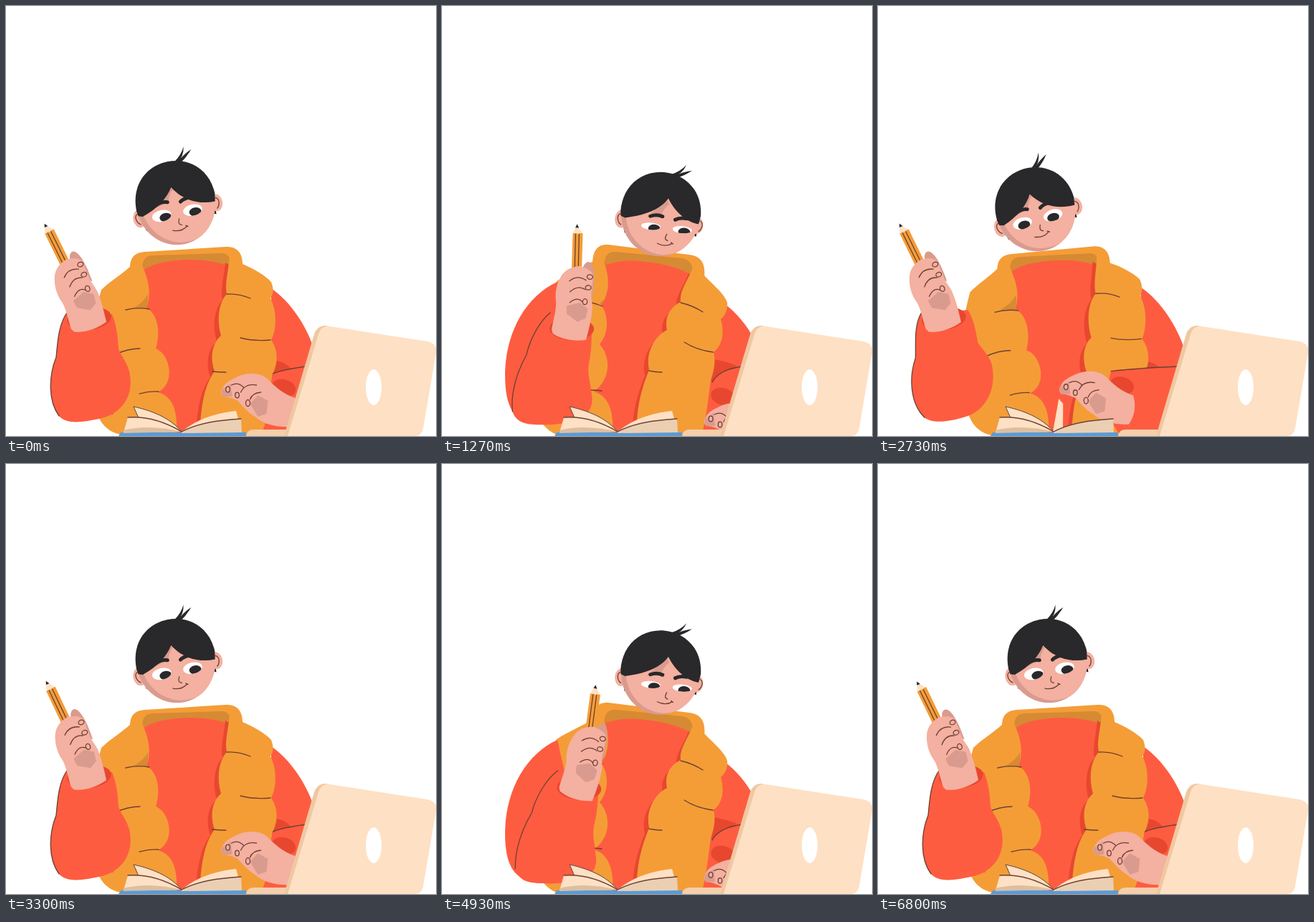
Recreate the animation shown at these times as an HTML page. Size 600 by 600 pixels, loop 6.83 s.

```html
<!DOCTYPE html>
<html lang="en">
<head>
<meta charset="utf-8">
<title>Studying</title>
<style>
html, body { margin: 0; width: 100%; height: 100%; overflow: hidden; background: #fff; }
svg { display: block; width: 100%; height: 100%; }
.red { fill: #fe5c40; }
.deep { fill: #e8472f; }
.vest { fill: #f49d37; }
.fold { fill: #d68a33; }
.skin { fill: #f4b0a0; }
.shade { fill: #d99b8e; }
.ink { fill: #29282a; }
.paper { fill: #fee0c4; }
.line { fill: none; stroke: #6d4034; stroke-width: 1.3; stroke-linecap: round; }
.nails { fill: #f4b0a0; }
.edge { stroke: #5b463c; stroke-width: 1; }
.brow { fill: none; stroke: #29282a; stroke-width: 5; stroke-linecap: round; }
</style>
</head>
<body>
<svg viewBox="0 0 600 600">
  <defs>
    <clipPath id="faceClip"><ellipse rx="55" ry="58.5"/></clipPath>
    <clipPath id="eyeClip">
      <ellipse class="eye" cx="-19" cy="15" rx="13.5" ry="8"/>
      <ellipse class="eye" cx="25" cy="16" rx="13.5" ry="8"/>
    </clipPath>
    <path id="panel" data-k="torso"
      d="M312 350 L330 360 C345 366 362 376 370 385 C374 395 373 402 369 408 C378 425 378 450 370 466 C380 480 380 500 371 515 C372 540 365 580 355 600 L270 600 C272 560 276 530 291 510 C284 490 288 470 300 460 C294 440 296 415 308 402 C305 388 310 372 312 350 Z"
      data-r="M350 365 L366 376 C375 386 395 402 398 414 C399 424 395 432 389 437 C394 455 392 473 379 483 C382 495 380 508 375 522 C372 545 368 580 362 600 L272 600 C270 560 280 530 289 508 C284 485 295 462 314 452 C310 435 318 420 333 413 C331 398 342 385 350 365 Z"/>
  </defs>

  <g id="body">
    <path class="red" data-k="torso"
      d="M370 394 C398 413 419 447 429 476 L430 605 L345 600 L370 500 Z"
      data-r="M392 414 C412 428 426 447 434 462 L430 605 L350 600 L375 490 Z"/>
    <path class="deep" data-k="torso"
      d="M372 494 Q392 496 398 508 L372 515 Z" data-r="M374 492 Q398 496 412 502 L376 524 Z"/>
    <path class="vest" data-k="torso"
      d="M173 370 C172 352 178 344 194 343 L306 336 C322 335 331 344 330 364 L314 368 L190 370 Z"
      data-r="M210 362 C210 342 216 332 232 333 L345 347 C362 349 368 360 366 378 L350 380 L222 365 Z"/>
    <path class="fold" data-k="torso"
      d="M190 368 C190 354 194 349 204 348 L300 345 C310 345 314 350 313 366 Z"
      data-r="M226 362 C227 347 232 342 244 343 L335 352 C346 354 351 360 350 380 Z"/>
    <path class="red" data-k="torso"
      d="M190 370 C205 358 230 355 255 354 C280 354 300 358 314 364 L330 605 L195 605 Z"
      data-r="M226 362 C245 355 265 354 285 357 C310 360 335 366 352 378 L330 605 L200 605 Z"/>
    <use class="deep" href="#panel" transform="translate(-6 8)"/>
    <path class="vest" data-k="torso"
      d="M175 362 C160 376 145 384 133 396 C120 440 110 500 125 560 C130 585 145 595 160 598 L238 600 C240 570 235 545 212 539 C238 525 228 485 209 478 C216 455 212 430 196 421 C204 400 198 380 190 362 Z"
      data-r="M211 356 C195 366 175 374 160 384 C140 430 120 500 130 560 C135 580 145 592 160 598 L238 600 C240 570 235 545 212 538 C236 520 236 490 220 472 C234 455 232 430 222 417 C234 400 234 380 227 360 Z"/>
    <path class="fold" data-k="torso" d="M198 402 Q192 414 178 421 L196 422 Q199 412 198 402 Z"
      data-r="M230 404 Q226 410 220 415 L222 417 Q228 410 230 404 Z"/>
    <use class="vest" href="#panel"/>
    <path class="line" data-k="torso"
      d="M167 424 Q183 420 200 423 M153 486 Q170 478 187 478 M186 541 Q200 537 213 538"
      data-r="M190 412 Q208 412 224 419 M170 476 Q182 470 200 470 M196 537 Q210 535 223 537"/>
    <path class="line" data-k="torso"
      d="M308 402 Q325 401 341 408 M327 463 Q345 468 369 466 M288 510 Q298 511 307 511"
      data-r="M333 414 Q350 418 364 427 M338 469 Q355 480 378 483 M289 509 Q298 511 307 511"/>
  </g>

  <g id="head">
    <path class="ink" d="M-55 0 L-48 30 L0 0 L52 27 L55 0 Z"/>
    <g id="tuft" class="ink">
      <path d="M9 -56 Q20 -64 25 -76 Q24 -62 13 -54 Z"/>
      <path d="M13 -55 Q25 -66 35 -71 Q28 -61 17 -53 Z"/>
    </g>
    <ellipse class="skin" cx="-54" cy="11" rx="9" ry="12.5"/>
    <ellipse id="farEar" class="skin" cx="55" cy="11" rx="9" ry="12"/>
    <path class="line" d="M-50 4 Q-60 2 -59 11 Q-58 17 -54 19 M55 4 Q60 6 59 12 Q58 17 55 19"/>
    <ellipse class="shade" rx="55" ry="58.5"/>
    <g clip-path="url(#faceClip)"><ellipse class="skin" cx="6" cy="-4" rx="55" ry="60"/></g>
    <g id="look">
      <path class="shade" d="M0 -24 L-26 3 L-6 -2 Q-3 -12 4 -18 Z"/>
      <g fill="#fff">
        <ellipse class="eye" cx="-19" cy="15" rx="13.5" ry="8"/>
        <ellipse class="eye" cx="25" cy="16" rx="13.5" ry="8"/>
      </g>
      <g class="ink" clip-path="url(#eyeClip)">
        <g id="pupils">
          <ellipse cx="-14" cy="18" rx="8.5" ry="6"/>
          <ellipse cx="28" cy="19" rx="8.5" ry="6"/>
        </g>
      </g>
      <path id="brows" class="brow" d="M-21 1 Q-12 -3 -4 0 M14 3 Q20 -1 30 0"/>
      <path class="line" d="M4 24 Q0 32 6 33 M-8 38 Q4 43 13 36 M11 35 L14 37"/>
    </g>
    <path class="ink" data-k="face"
      d="M-56 0 C-56 -37 -30 -59 0 -59 C30 -59 56 -37 56 -2 L54 9 C35 9 14 -2 2 -23 C-6 -10 -22 2 -49 9 L-55 7 Z"
      data-r="M-56 0 C-56 -37 -30 -59 0 -59 C30 -59 56 -37 56 -2 L54 9 C36 9 15 -2 3 -23 C-5 -10 -21 2 -49 9 L-55 7 Z"/>
  </g>

  <path class="red" data-k="shoulder"
    d="M120 450 C105 450 90 465 82 490 C68 520 66 560 90 570 L150 570 Z"
    data-r="M161 385 C118 404 88 455 88 515 C88 560 100 584 140 584 L205 580 Z"/>
  <path class="red" data-k="arm"
    d="M85 428 C73 445 72 470 70 490 C60 515 58 550 74 572 C85 585 110 580 130 576 C160 570 180 545 172 510 C168 495 160 488 157 478 C156 460 154 445 148 430 Z"
    data-r="M150 428 C135 440 122 465 117 487 C104 510 95 540 98 566 C105 586 125 584 150 584 C190 582 214 570 208 540 C206 520 202 515 204 500 C208 480 208 465 208 445 Z"/>
  <path class="line" data-k="arm"
    d="M85 428 C73 445 72 470 70 490 C60 515 58 550 74 572"
    data-r="M150 428 C135 440 122 465 117 487 C104 510 95 540 98 566"/>

  <ellipse id="cuffL" class="deep" rx="31" ry="16"/>
  <g id="handL">
    <path class="shade" d="M8 -86 C9 -96 16 -100 20 -94 C26 -85 26 -65 25 -48 L8 -60 Z"/>
    <path class="vest" d="M-10 -135 L4 -136 L7 -80 L-7 -80 Z"/>
    <path class="paper" d="M-10 -134 L-6 -145 L-4 -145 L4 -135 Q0 -138 -3 -134 Q-6 -138 -10 -134 Z"/>
    <path class="ink" d="M-7 -143 L-5 -148 L-2 -143 Z"/>
    <path class="line" d="M-6 -134 L-3 -84 M-1 -134 L2 -84"/>
    <path class="skin" d="M-28 2 C-27 -12 -24 -24 -25 -36 C-29 -52 -25 -66 -21 -74 C-16 -84 -6 -89 4 -90 C14 -88 25 -84 24 -74 C22 -68 24 -62 23 -56 C22 -48 26 -40 26 -32 C26 -18 24 -4 21 12 C4 16 -14 14 -26 7 Z"/>
    <path class="shade" d="M-10 -33 L8 -39 L20 -31 L18 -18 L7 -12 L-9 -22 Z"/>
    <path class="line" d="M-9 -68 Q1 -78 14 -71 M-7 -53 Q3 -64 14 -58 M-6 -38 Q4 -48 12 -40"/>
    <g class="line" style="fill:#f4b0a0">
      <ellipse cx="19" cy="-76" rx="4" ry="3.2"/>
      <ellipse cx="18" cy="-61" rx="4" ry="3.2"/>
      <ellipse cx="15" cy="-41" rx="3.2" ry="4"/>
    </g>
  </g>

  <path id="sleeve" class="red"/>
  <path id="sleeveLine" class="line"/>
  <ellipse id="cuffR" class="deep" rx="17" ry="12"/>
  <path id="page" class="paper"/>
  <g id="handR">
    <path class="skin" d="M-83 -12 C-80 -20 -70 -24 -64 -27 C-50 -34 -30 -34 -20 -24 C-10 -14 0 -4 18 2 Q24 24 12 42 C-5 43 -25 40 -38 28 C-48 22 -55 14 -62 6 C-70 2 -76 0 -82 0 C-86 -3 -86 -8 -83 -12 Z"/>
    <path class="shade" d="M-84 -10 L-72 -18 L-70 0 L-82 0 Q-86 -4 -84 -10 Z M-45 10 L-34 -2 L-20 6 L-22 24 L-34 28 Z"/>
    <path class="line" d="M-71 -16 Q-62 -21 -54 -13 M-58 -6 Q-52 -19 -36 -16 M-45 4 Q-42 -5 -30 -6"/>
    <g class="line" style="fill:#f4b0a0">
      <ellipse cx="-76" cy="-10" rx="2.8" ry="3.8"/>
      <ellipse cx="-63" cy="-2" rx="2.8" ry="3.8"/>
      <ellipse cx="-48" cy="9" rx="3" ry="4.5"/>
    </g>
  </g>

  <g id="book">
    <path fill="#5b9bd5" d="M157 600 L160 595 L335 595 L335 600 Z"/>
    <path class="paper edge" d="M178 559 C210 566 232 578 245 594 L186 577 Z"/>
    <path class="paper" d="M170 574 C200 572 225 582 245 594 L164 595 Z"/>
    <path fill="#dcbfa3" d="M164 592 Q200 583 245 594 L164 596 Z"/>
    <path class="line" d="M170 574 C200 572 225 582 245 594"/>
    <path fill="#ebcfb2" d="M245 594 C270 580 300 577 328 576 L329 595 L245 596 Z"/>
    <path id="topSheet" class="paper" d="M245 594 C265 577 295 567 321 565 L324 576 C295 578 265 585 245 594 Z"/>
    <path class="line" d="M245 594 C268 582 295 578 328 576"/>
  </g>

  <g id="laptop">
    <path fill="#f3cfac" d="M335 600 Q336 591 346 591 L400 591 L400 600 Z"/>
    <path fill="#efc8a2" d="M388 600 L430 458 Q434 446 446 446 L500 460 L480 600 Z"/>
    <path class="paper" d="M393 600 L436 458 Q440 445 452 447 L588 468 Q602 471 600 484 L582 590 Q580 600 570 600 Z"/>
    <ellipse cx="513" cy="532" rx="11" ry="25" fill="#fff"/>
  </g>
</svg>
<script>
const SWAY = 3415; // two sways per 6830 ms loop
const { min, max, sin, cos, PI } = Math;

const mix = (a, b, s) => a + (b - a) * s;
const ease = s => s * s * (3 - 2 * s);

// eases from key to key; each key is [time, value]
function track(...keys) {
  keys.push([SWAY, keys[0][1]]);
  return time => {
    const t = (time + SWAY) % SWAY;
    const i = keys.findIndex(k => k[0] > t);
    const [t0, v0] = keys[i - 1], [t1, v1] = keys[i];
    return mix(v0, v1, ease((t - t0) / (t1 - t0)));
  };
}

// lean: 0 at rest, 1 towards the laptop, below 0 towards the book
const torsoLean = track([0, 0], [700, 1], [1600, 1], [2350, -.3], [3200, 0]);
const headLean = track([0, 0], [600, 1], [1600, 1], [2300, -.22], [2730, -.25], [3150, 0]);
const armLean = track([0, 0], [700, 1], [1200, 1], [1600, 1.2], [2400, -.6], [3200, 0]);
const headHeight = track([0, 275], [700, 290], [2150, 292], [2320, 280], [2730, 284], [3200, 275]);

// the typing hand: 0 on the book, 1 on the keys; it rests in between
const TYPE = [500, 1650], TURN = [2400, 3050], REST = .65;
const reach = track([0, REST], [TYPE[0], 1], [TYPE[1], 1], [2300, 0], [TURN[1], REST]);
const during = (t, [from, to]) => min(1, max(0, (t - from) / (to - from)));

const $ = id => document.getElementById(id);
const number = /-?\d+(?:\.\d+)?/g;
const morphs = [...document.querySelectorAll('[data-k]')].map(el => ({
  el, key: el.dataset.k, from: el.getAttribute('d'), to: el.dataset.r.match(number).map(Number)
}));
const eyes = document.querySelectorAll('.eye');
const move = (el, x, y, r = 0) =>
  $(el).setAttribute('transform', `translate(${x} ${y}) rotate(${r})`);

function drawHead(t, lean, face, focus) {
  move('head', 237 + 68 * lean, headHeight(t), -12 + 17 * lean);
  move('look', face, face * .4);
  move('brows', min(0, face) * .8, min(0, face) * .5);
  move('pupils', min(0, lean) * 14, 0);
  eyes.forEach(e => e.setAttribute('ry', 8 - 3 * focus));
  $('farEar').setAttribute('cx', 55 - max(0, face) * .5);
  const drag = lean - headLean(t - 80);
  $('tuft').setAttribute('transform', `rotate(${5 + 10 * lean - 70 * drag} 12 -55)`);
}

function drawPencilHand(t, arm) {
  const x = 116 + 64 * arm, y = 438 + 14 * max(0, arm);
  const wag = 3 - 7 * cos(2 * PI * (t - 300) / SWAY);
  const angle = -20 + 20 * arm + wag;
  move('cuffL', x, y - 2, angle * .3);
  move('handL', x, y, angle);
}

function drawTypingHand(t) {
  const r = reach(t), turn = during(t, TURN);
  const typing = max(0, r - REST) / (1 - REST);
  const x = mix(264, 451, r);
  const y = mix(567, 545, min(1, r / REST)) + 41 * typing
    - 12 * sin(PI * turn) - 4 * sin(6 * PI * during(t, TYPE)) ** 2;
  const wx = min(x, 390), wy = min(y - 16, 541);
  const top = `M${wx - 13} ${wy - 16} Q${(wx + 400) / 2 - 10} ${min(wy - 20, 508)} 418 503`;
  $('sleeve').setAttribute('d',
    `${top} L440 605 L${wx + 12} 605 C${wx - 14} 600 ${wx - 24} ${wy + 20} ${wx - 13} ${wy - 16} Z`);
  $('sleeveLine').setAttribute('d', top);
  move('cuffR', wx + 2, wy + 4, 15);
  move('handR', x, y);
  drawPage(turn);
}

function drawPage(turn) {
  const turning = turn > 0 && turn < 1;
  $('page').style.display = turning ? '' : 'none';
  $('topSheet').style.display = turning ? 'none' : '';
  const x = mix(185, 321, turn), y = 566 - 18 * sin(PI * turn);
  $('page').setAttribute('d',
    `M244 594 Q${(x + 244) / 2} ${y + 18} ${x - 2} ${y} L${x + 4} ${y + 7} Q${(x + 262) / 2} ${y + 28} 258 594 Z`);
}

function draw(t) {
  const torso = torsoLean(t), arm = armLean(t), lean = headLean(t);
  const turned = max(0, lean) ** 3;
  const pose = { torso, arm, shoulder: min(1, arm), face: -4 + 11 * turned };

  for (const { el, key, from, to } of morphs) {
    let i = 0;
    el.setAttribute('d', from.replace(number, v => mix(+v, to[i++], pose[key]).toFixed(2)));
  }
  move('body', 0, 5 * sin(PI * torso) ** 2);
  drawHead(t, lean, pose.face, turned ** 2);
  drawPencilHand(t, arm);
  drawTypingHand(t);
}

function frame() {
  draw(performance.now() % SWAY);
  requestAnimationFrame(frame);
}
frame();
</script>
</body>
</html>
```
